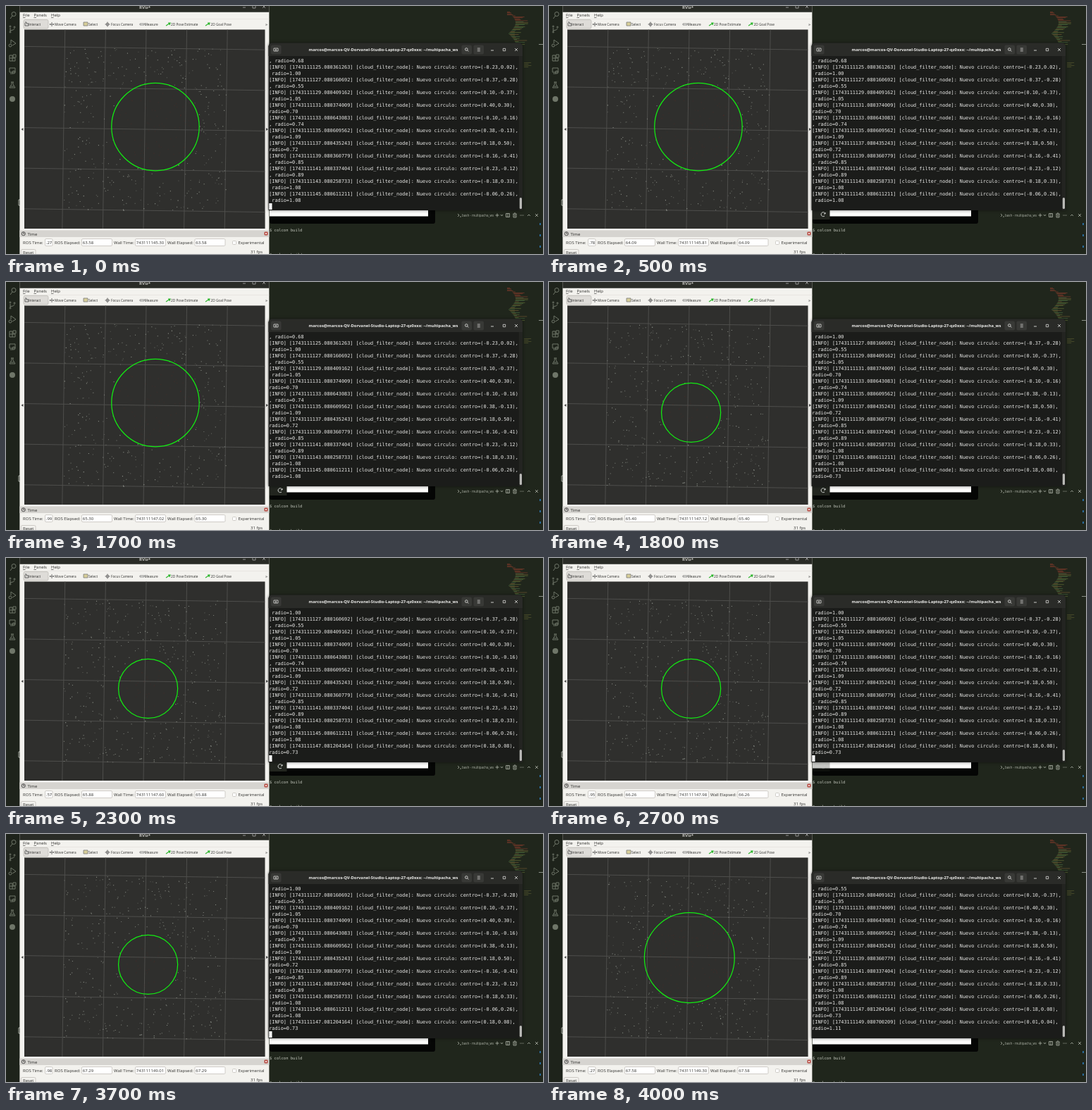
An HTML page with a canvas that plays this animation: 762x352 px, repeating every 4.1 s.

```html
<!DOCTYPE html>
<html lang="es">
<head>
<meta charset="utf-8">
<style>
html, body { margin: 0; width: 762px; height: 352px; overflow: hidden; background: #20261c; }
canvas { display: block; }
</style>
</head>
<body>
<canvas id="stage" width="762" height="352"></canvas>
<script>
const ctx = document.getElementById('stage').getContext('2d');
const LOOP = 4100, SANS = '"Open Sans", sans-serif', MONO = '"DejaVu Sans Mono", monospace';
const COLUMNS = 86, VISIBLE_ROWS = 23;

// time stamp, centre x, centre y, radius
const log = [
  ['125.080361263', -0.23, 0.02, 1.00], ['127.080160692', -0.37, -0.28, 0.55],
  ['129.080409162', 0.10, -0.37, 1.05], ['131.080374009', 0.40, 0.30, 0.70],
  ['133.080643083', -0.10, -0.16, 0.74], ['135.080609562', 0.38, -0.13, 1.09],
  ['137.080435243', 0.18, 0.50, 0.72], ['139.080360779', -0.16, -0.41, 0.85],
  ['141.080337404', -0.23, -0.12, 0.89], ['143.080258733', -0.18, 0.33, 1.08],
  ['145.080611211', -0.06, 0.26, 1.08], ['147.081204164', 0.18, 0.08, 0.73],
  ['149.080700209', 0.01, 0.04, 1.11]
];
const rows = [', radio=0.68'];
for (const [stamp, x, y, r] of log) {
  const line = `[INFO] [1743111${stamp}] [cloud_filter_node]: Nuevo circulo: ` +
    `centro=(${x.toFixed(2)},${y.toFixed(2)}), radio=${r.toFixed(2)}`;
  rows.push(line.slice(0, COLUMNS), line.slice(COLUMNS));
}

function random(seed) {
  return () => (seed = (seed * 16807) % 2147483647) / 2147483647;
}
function rect(x, y, w, h, color, radius = 0) {
  ctx.fillStyle = color;
  ctx.beginPath();
  ctx.roundRect(x, y, w, h, radius);
  ctx.fill();
}
function frame(x, y, w, h, color, radius = 0) {
  ctx.strokeStyle = color;
  ctx.lineWidth = 0.8;
  ctx.beginPath();
  ctx.roundRect(x, y, w, h, radius);
  ctx.stroke();
}
function text(str, x, y, size, color, { font = SANS, weight = '', align = 'left' } = {}) {
  ctx.font = `${weight} ${size}px ${font}`;
  ctx.textAlign = align;
  ctx.fillStyle = color;
  ctx.fillText(str, x, y);
}
function path(d, x, y, color, width = 1) {
  ctx.save();
  ctx.translate(x, y);
  ctx.strokeStyle = color;
  ctx.lineWidth = width;
  ctx.stroke(new Path2D(d));
  ctx.restore();
}
function disc(x, y, r, color) {
  ctx.fillStyle = color;
  ctx.beginPath();
  ctx.arc(x, y, r, 0, 7);
  ctx.fill();
}
const ring = (r, x = 0, y = 0) =>
  `M${x + r} ${y}A${r} ${r} 0 1 1 ${x - r} ${y}A${r} ${r} 0 1 1 ${x + r} ${y}`;
const CROSS = 'M-2-2L2 2M2-2L-2 2', BOX = 'M-2-2H2V2H-2Z';

function drawEditor(ms) {
  rect(0, 0, 762, 352, '#20261c');
  rect(0, 0, 20, 352, '#1e231b');
  const grey = '#6f7669';
  path(ring(3, 1, -1.5) + 'M-1 1L-4 5', 10, 13, grey);
  path('M-3-2V3M3-1Q3 1-3 2' + ring(1, -3, -4) + ring(1, 3, -3) + ring(1, -3, 4), 9, 33, grey);
  path('M-2-5L5 0L0 3M-2-5V0' + ring(2, -3, 3), 9, 53, grey);
  path('M-4-3H0V5H-4ZM-4 1H4V5H0M1-4H5V0H1Z', 9, 73, grey);
  path('M-4-4H4V2H-4ZM-3 4H1' + ring(2, 2, 2), 9, 92, grey);
  path('M-2-4H2M-1-4V-1L-4 4H4L1-1V-4M-2 2H2', 9, 112, grey);
  disc(9, 132, 4, grey);
  path('M2-4H0V4H2', 18, 279, '#a4aaa0');

  const rnd = random(77);
  for (let i = 0; i < 34; i++) {
    const indent = i < 4 ? 0 : 2 + 10 * Math.abs(Math.sin(i / 7));
    const color = i < 10 ? '#7d3a2a' : ['#5b6a34', '#44653f', '#6b5630'][i % 3];
    rect(711 + indent, 8 + i * 1.4, 4 + rnd() * 14, 0.7, color);
  }
  for (let i = 0; i < 4; i++) rect(735, 80 + i * 2, 4 + rnd() * 9, 0.7, '#55582f');
  rect(756, 54, 6, 1, '#8b9088');
  for (const y of [308, 324, 340]) rect(757, y, 2, 3, '#2a6a9a');

  rect(374, 285, 235, 24, '#050605', 3);
  rect(374, 288, 225, 10.5, '#fcfcfb');
  ctx.globalAlpha = ms >= 500 && ms < 2700 ? 1 : ms === 2700 ? 0.25 : 0;
  rect(374, 288, 24.5, 15, '#22251f');
  path('M3-1A3 3 0 1 0 2 2M3-3V-1H1', 389, 296, '#d0d3d0');
  ctx.globalAlpha = 1;

  for (const y of [320, 354.5]) text('$ colcon build', 374, y, 5.5, '#c4c8be', { font: MONO });
  const pale = '#b0b5aa';
  path('M-2-1L0 1L-2 3M1 3H3', 643, 296, pale, 0.8);
  text('bash - multipacha_ws', 647, 299, 4.5, pale);
  path('M-2.5 0H2.5M0-2.5V2.5M5-1L6.5 1L8-1', 697, 297, pale, 0.8);
  path('M-2.5-2.5H2.5V2.5H-2.5ZM0-2.5V2.5', 712, 297, pale, 0.8);
  path('M-2.5-2H2.5M-2-2V3H2V-2M-1-3H1M0-1V2', 722, 297, pale, 0.8);
  for (const x of [730, 732, 734]) disc(x, 297, 0.6, pale);
  path('M-2 1L0-1L2 1', 742, 297, pale, 0.8);
  path(CROSS, 753, 297, pale, 0.8);
}

function drawScene([, mx, my, radius]) {
  const UNIT = 57.6, X0 = 197, Y0 = 175;
  const cx = X0 + my * UNIT, cy = Y0 + mx * UNIT, r = radius * UNIT;
  ctx.save();
  ctx.beginPath();
  ctx.rect(26, 33.5, 341.5, 282.5);
  ctx.clip();
  rect(26, 33, 342, 284, '#2f2f2d');

  ctx.save();
  ctx.translate(X0, Y0);
  ctx.rotate(0.014);
  ctx.strokeStyle = '#52524f';
  ctx.lineWidth = 0.9;
  ctx.beginPath();
  for (let i = -3; i <= 3; i++) {
    ctx.moveTo(i * UNIT, -200);
    ctx.lineTo(i * UNIT, 200);
    ctx.moveTo(-200, i * UNIT);
    ctx.lineTo(200, i * UNIT);
  }
  ctx.stroke();
  ctx.restore();

  const rnd = random(Math.round(radius * 9000) + Math.round(my * 100));
  for (let i = 0; i < 450; i++) {
    const x = X0 + (rnd() - 0.5) * 4 * UNIT, y = Y0 + (rnd() - 0.5) * 4 * UNIT;
    const inside = Math.hypot(x - cx, y - cy) < r, tone = 0.2 + rnd() * 0.45;
    rect(x, y, 1.1, 1.1, inside ? 'rgba(110,40,34,.25)' : `rgba(195,202,190,${tone})`);
  }
  ctx.strokeStyle = '#12ec12';
  ctx.lineWidth = 1.25;
  ctx.beginPath();
  ctx.arc(cx, cy, r, 0, 7);
  ctx.stroke();
  ctx.restore();
}

function drawViewer(elapsed, entry) {
  const ink = '#30302e';
  rect(19.4, 0, 354, 352, '#f3f2ee');
  rect(19.4, 0, 354, 8.8, '#292b26');
  text('RViz*', 197, 3.5, 6, '#c4c4c0', { weight: 'bold', align: 'center' });
  path('M-2 1H2', 338, 1, '#aaa', 0.8);
  path(BOX, 352, 1, '#aaa', 0.8);
  path(CROSS, 366, 1, '#aaa', 0.8);
  [['File', 24], ['Panels', 39.5], ['Help', 64]].forEach(([label, x]) => {
    text(label, x, 15.3, 6, ink);
    rect(x, 16.2, 3.5, 0.6, ink);
  });
  rect(19.4, 18.5, 354, 0.6, '#dddbd7');

  rect(25, 19.5, 35, 12.5, '#dedcd8', 2);
  frame(25, 19.5, 35, 12.5, '#bebbb6', 2);
  const tools = [['Interact', 32.2], ['Move Camera', 69], ['Select', 117], ['Focus Camera', 149],
    ['Measure', 196.5], ['2D Pose Estimate', 234], ['2D Goal Pose', 290.5]];
  for (const [label, x] of tools) text(label, x, 27.7, 4.75, ink);
  path('M-2-2V2H3V-1H0V-3H-2', 29, 26, '#555', 0.9);
  path('M-3 0H3M0-3V3M-2-1L-3 0L-2 1M2-1L3 0L2 1', 65, 26, '#555', 0.8);
  rect(110, 23, 6, 5, '#d8cf9a');
  frame(110, 23, 6, 5, '#777');
  path(ring(2) + 'M-3.5 0H3.5M0-3.5V3.5', 144, 26, '#666', 0.8);
  path('M-3-1H3V1H-3Z', 193, 26, '#777', 0.8);
  for (const x of [230, 286]) path('M-3 2L3-2M0-2H3L2 1', x, 26, '#2fb62f', 1.2);
  text('»', 368, 27.5, 6, ink);

  drawScene(entry);
  ctx.fillStyle = '#444';
  ctx.fill(new Path2D('M24.5 173V177L21.5 175ZM369 173V177L372 175Z'));

  rect(19.4, 318.5, 354, 9.5, '#d6d4d0');
  path(ring(2.6) + 'M0-2V0H1.5', 24.8, 323.2, '#333', 0.8);
  text('Time', 30.5, 325.5, 6, ink);
  rect(366.5, 320.5, 5, 5, '#b84b42', 1);
  path('M-1-1L1 1M1-1L-1 1', 369, 323, '#fff', 0.8);

  const now = elapsed.toFixed(2);
  const fields = [
    ['ROS Time:', 24, 55.5, 10.5, '.' + (elapsed + 81.69).toFixed(2).split('.')[1]],
    ['ROS Elapsed:', 69, 107.5, 43, now],
    ['Wall Time:', 153, 183.5, 43, '743111' + (elapsed + 81.72).toFixed(2)],
    ['Wall Elapsed:', 229, 268, 43, now]
  ];
  for (const [label, x, boxX, boxW, value] of fields) {
    text(label, x, 338, 6, ink);
    rect(boxX, 330.5, boxW, 10, '#fff', 1.5);
    frame(boxX, 330.5, boxW, 10, '#c4c1bc', 1.5);
    text(value, boxX + 1.3, 338, 6, ink);
  }
  rect(321.5, 333.5, 5, 5, '#fff', 1);
  frame(321.5, 333.5, 5, 5, '#c4c1bc', 1);
  text('Experimental', 329.5, 338, 6, ink);
  frame(21.5, 345.5, 20.5, 10, '#c4c1bc', 1.5);
  text('Reset', 24, 352.3, 6, ink);
  text('31 fps', 347, 351, 6, ink);
}

function drawTerminal(step, cursorOn) {
  ctx.save();
  ctx.shadowColor = 'rgba(0,0,0,.5)';
  ctx.shadowBlur = 4;
  rect(372.5, 52.5, 360.5, 237.5, '#1b1c1a', [5, 5, 0, 0]);
  ctx.restore();
  rect(372.5, 52.5, 360.5, 18.5, '#2a2b28', [5, 5, 0, 0]);
  const light = '#dcdcda';
  for (const x of [376, 646.5, 663.5]) rect(x, 55.5, 14.5, 13, '#383936', 2);
  path('M-3 2V-2H3V2ZM0-1V2M-1 0H1', 383, 62, light, 0.8);
  path(ring(1.8) + 'M1.3 1.3L3 3', 653.3, 61.5, light, 0.9);
  path('M-2-2H2M-2 0H2M-2 2H2', 670.8, 62, light, 0.7);
  path('M-2 2H2', 690, 61, light, 0.9);
  path('M-1.7-1.7H1.7V1.7H-1.7Z', 707, 62, light, 0.8);
  path(CROSS, 724, 62, light, 0.8);
  text('marcos@marcos-QV-Dorvanel-Studio-Laptop-27-qz0xxx: ~/multipacha_ws', 535.5, 64.2, 5.84,
    '#f0f0ee', { weight: 'bold', align: 'center' });

  rows.slice(2 * step, 2 * step + VISIBLE_ROWS).forEach((row, i) =>
    text(row, 373.2, 79.5 + i * 9.045, 6.84, '#eaeae8', { font: MONO }));
  if (cursorOn) rect(373.3, 280, 4.2, 9, '#fff');
  rect(727.8, 71, 5.2, 219, '#232421');
  rect(728.8, 272, 3.2, 16, '#b9b9b6', 1.5);
}

const clock = [[0, 63.58], [900, 64.5], [1700, 65.3], [1800, 65.4], [2700, 66.26], [3700, 67.29], [4000, 67.58]];
function elapsedAt(ms) {
  const i = Math.max(1, clock.findIndex(([t]) => t >= ms));
  const [t0, v0] = clock[i - 1], [t1, v1] = clock[i];
  return v0 + (v1 - v0) * (ms - t0) / (t1 - t0);
}

function draw() {
  const ms = Math.floor(performance.now() % LOOP / 100) * 100;
  const step = ms < 1800 ? 0 : ms < 3800 ? 1 : 2;
  drawEditor(ms);
  drawViewer(elapsedAt(ms), log[10 + step]);
  drawTerminal(step, (ms + 200) % 1200 < 600);
  requestAnimationFrame(draw);
}
draw();
</script>
</body>
</html>
```
